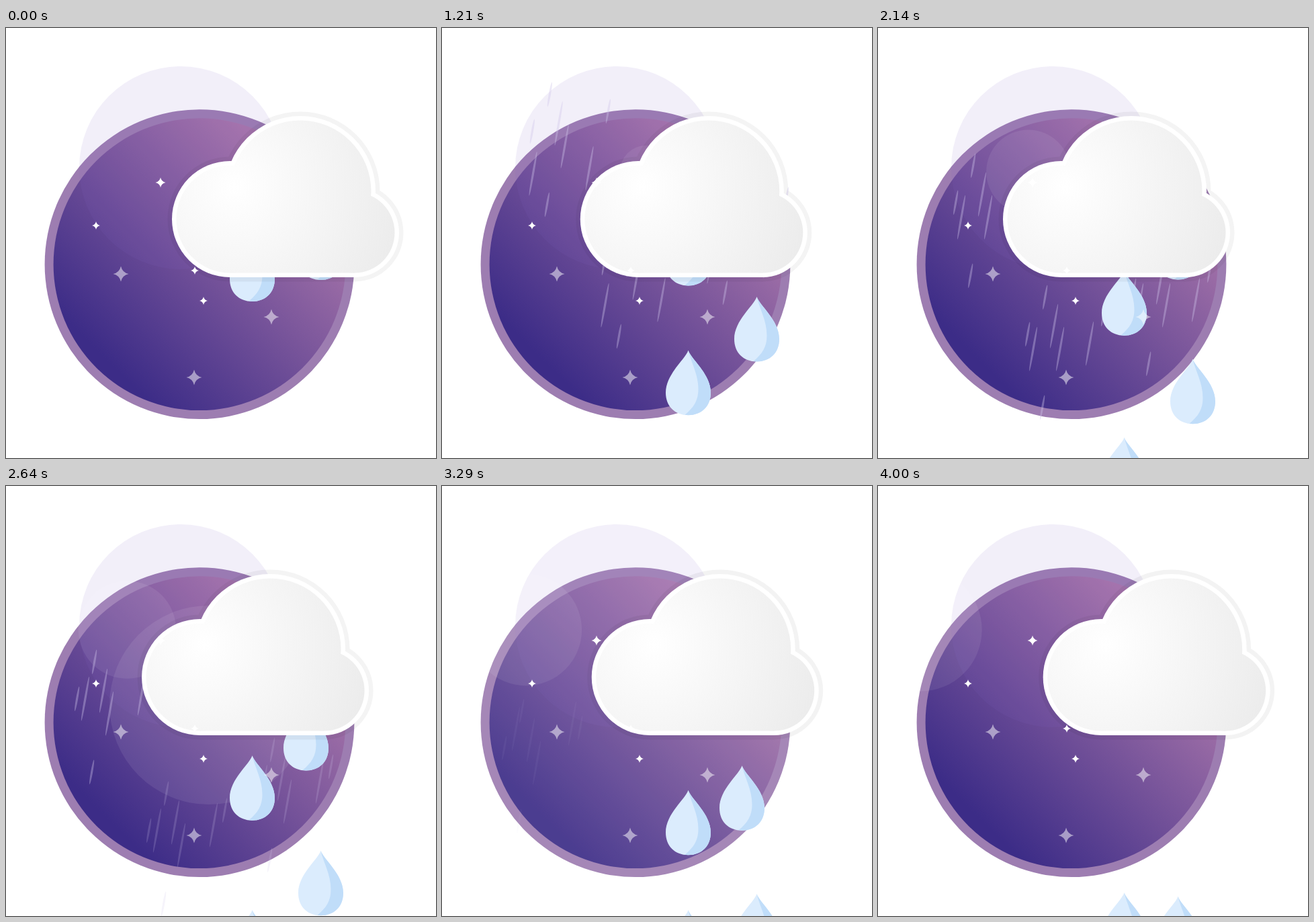
Recreate the animation shown at these times as an HTML page. Size 640 by 640 pixels, loop 4070 ms.

```html
<!DOCTYPE html>
<html lang="en">
<head>
<meta charset="utf-8">
<title>Rainy night</title>
<style>
  html, body { margin: 0; width: 100%; height: 100%; overflow: hidden; background: #fff; }
  svg { display: block; width: 100vw; height: 100vh; }
</style>
</head>
<body>
<svg viewBox="0 0 640 640">
  <defs>
    <linearGradient id="night" gradientUnits="userSpaceOnUse" x1="148" y1="492" x2="422" y2="218">
      <stop offset="0" stop-color="#3c2c87"/>
      <stop offset="1" stop-color="#a875aa"/>
    </linearGradient>
    <radialGradient id="fluff" gradientUnits="userSpaceOnUse" cx="340" cy="236" r="250">
      <stop offset="0" stop-color="#fff"/>
      <stop offset="1" stop-color="#ececec"/>
    </radialGradient>
    <g id="drop">
      <path fill="#dbecfd" d="M0 0C4 13 33.5 35 33.5 63C33.5 83 20 96.5 0 96.5C-20 96.5-33.5 83-33.5 63C-33.5 35-4 13 0 0Z"/>
      <path fill="#c0ddf9" d="M0 0C4 13 33.5 35 33.5 63C33.5 83 20 96.5 0 96.5L-5 96C8 85 15 75 15 58C15 35 4 18 0 0Z"/>
    </g>
  </defs>
  <circle cx="288" cy="351.7" r="230.4" fill="#9d7db1"/>
  <circle cx="288" cy="351.7" r="217.4" fill="url(#night)"/>
  <circle cx="260" cy="208" r="151" fill="#7d5fc3" opacity=".1"/>
  <circle id="small" cy="214" fill="#fff" opacity=".075"/>
  <circle id="big" cx="302" cy="326" fill="#fff"/>
  <g id="rain" fill="#cfc5ea"></g>
  <g id="drops"></g>
  <g id="cloud"></g>
  <g id="stars" fill="#fff"></g>
</svg>
<script>
const LOOP = 4070, STEP = LOOP / 57;
const $ = id => document.getElementById(id);
const clamp = v => Math.min(1, Math.max(0, v));

function set(el, attrs) {
  for (const k in attrs) el.setAttribute(k, attrs[k]);
}

function add(parent, tag, attrs = {}) {
  const el = document.createElementNS('http://www.w3.org/2000/svg', tag);
  set(el, attrs);
  return parent.appendChild(el);
}

// Cloud silhouette grown (or shrunk) by d
function puff(d, attrs) {
  const g = add($('cloud'), 'g', attrs);
  for (const [cx, cy, r] of [[333.5, 284.5, 86.5], [438, 243, 112], [518.5, 304.5, 66.5]])
    add(g, 'circle', { cx, cy, r: r + d });
  add(g, 'rect', { x: 333.5, y: 260, width: 185, height: 111 + d });
}
puff(6.5, { fill: '#000', opacity: .045 });
puff(0, { fill: '#fff' });
puff(-6.5, { fill: 'url(#fluff)' });

function star(x, y, r) {
  const a = r * .18;
  add($('stars'), 'path', {
    d: `M0 ${-r}Q${a} ${-a} ${r} 0Q${a} ${a} 0 ${r}Q${-a} ${a} ${-r} 0Q${-a} ${-a} 0 ${-r}Z`,
    transform: `translate(${x} ${y})`,
    opacity: r > 10 ? .5 : 1
  });
}
star(230, 230, 7.5);
for (const [x, y] of [[134, 294], [281, 361], [294, 406]]) star(x, y, 6);
for (const [x, y] of [[171, 366], [395, 430], [280, 520]]) star(x, y, 11.5);

// Every second streak is long, every fourth is far away and slow
const STREAKS = [[0, 0], [16, 28], [-26, 55], [-15, 62], [-4, 164], [25, 62], [87, 25], [69, 54]];
const RAIN_T = 2140, SLANT = 10, DRIFT = Math.tan(SLANT * Math.PI / 180);

function shower(x, y, born) {
  const g = add($('rain'), 'g');
  const streaks = STREAKS.map(([dx, dy], i) => {
    const ry = i % 2 ? 33.5 : 18.5;
    return {
      el: add(g, 'ellipse', { rx: 1.6, ry }),
      x: x + dx - ry * DRIFT, y: y + dy + ry, speed: i % 4 === 3 ? .07 : .114
    };
  });
  return t => {
    set(g, { opacity: .38 * clamp((t - born) / 300) * clamp((born + 2750 - t) / 400) });
    for (const s of streaks) {
      const fall = s.speed * (t - RAIN_T);
      set(s.el, { transform: `translate(${s.x - fall * DRIFT} ${s.y + fall}) rotate(${SLANT})` });
    }
  };
}

// A drop sinks steadily, then may speed up after a given time
function drop(x, y, speed, { end = 700, after = LOOP, pull = 0 } = {}) {
  const el = add($('drops'), 'use', { href: '#drop' });
  return t => {
    const tip = y + speed * t + pull * Math.max(0, t - after) ** 2;
    set(el, { transform: `translate(${x} ${Math.min(end, Math.max(200, tip))})` });
  };
}

// Drift left, then back, at an even pace
function moveCloud(t) {
  const turn = 1965, back = 4040;
  const k = t < turn ? t / turn : clamp((back - t) / (back - turn));
  set($('cloud'), { transform: `translate(${-66.7 * k} 0)` });
}

function moveGlow(t) {
  set($('small'), { cx: 409 - .0865 * t, r: .0365 * t - 3.4e-6 * t * t });
  set($('big'), { r: Math.max(0, t - 2050) * .25, opacity: .08 * clamp((3460 - t) / 170) });
}

const movers = [
  moveCloud, moveGlow,
  shower(145, 186, 600), shower(252, 382, 100), shower(410, 317, 100),
  drop(366.5, 310.5, .1395, { end: 631 }),
  drop(468.5, 278.5, .1),
  drop(366.5, 190, .08, { after: 3290, pull: 1.9e-4 }),
  drop(446.5, 68, .098, { after: 2770, pull: 1e-4 })
];

const start = performance.now();
function tick() {
  const now = (performance.now() - start) % LOOP;
  const t = Math.floor(now / STEP + .1) * STEP;
  for (const move of movers) move(t);
  requestAnimationFrame(tick);
}
tick();
</script>
</body>
</html>
```
